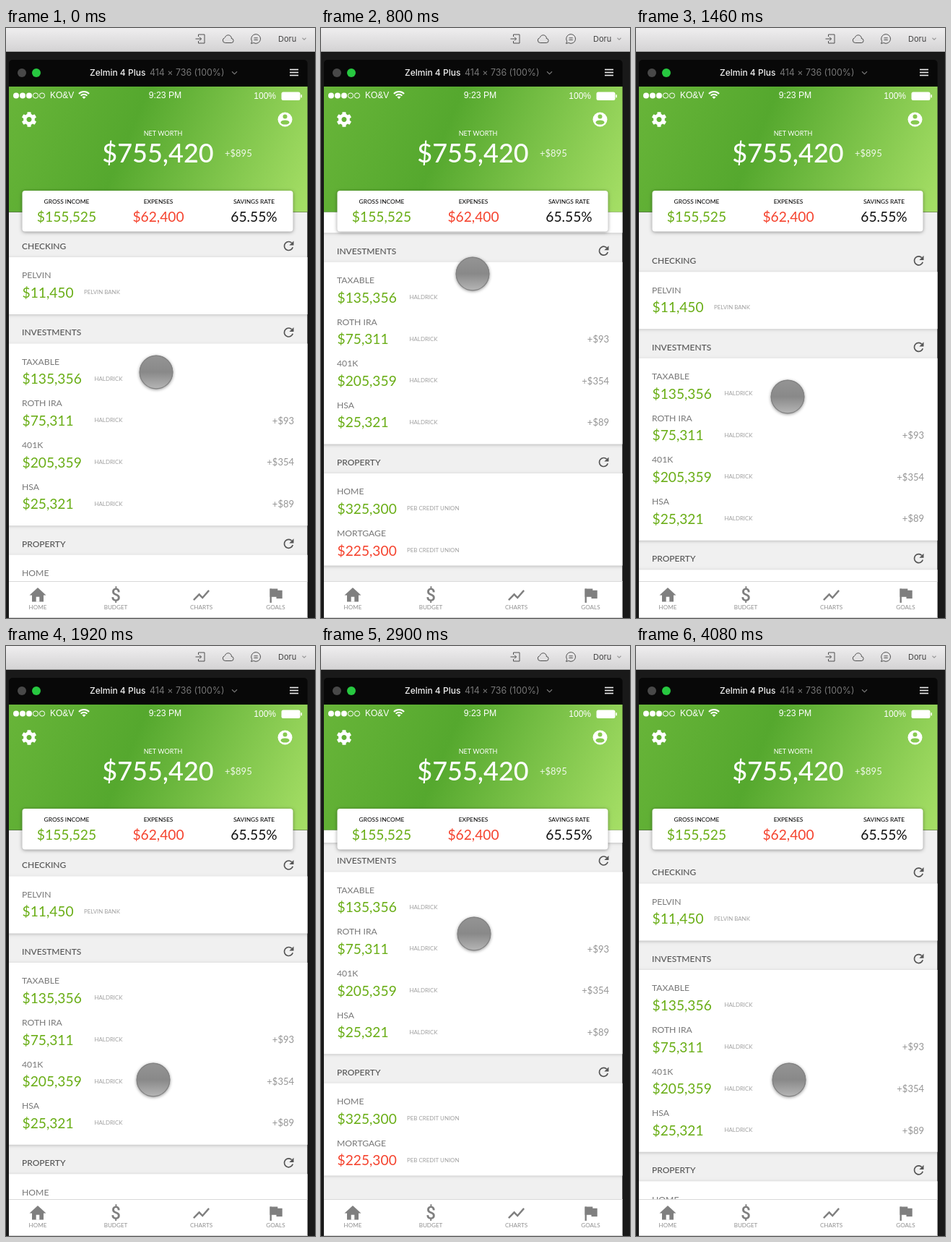
An HTML page with a canvas for the animation above (4.1 s loop, 428 by 816 pixels).

```html
<!DOCTYPE html>
<html lang="en">
<head>
<meta charset="utf-8">
<title>Net worth</title>
<style>
html, body { margin: 0; width: 100%; height: 100%; overflow: hidden; background: #161616; }
canvas { display: block; width: 428px; height: 816px; }
</style>
</head>
<body>
<canvas id="stage"></canvas>
<script>
const W = 428, H = 816, LOOP = 4100;
const LEFT = 4, RIGHT = 417.6, WIDE = RIGHT - LEFT;
const TOP = 81, HEAD = 254.5, NAV = 765, STEP = 57.6;
const GREEN = '#6aae17', RED = '#f5432e', GRAY = '#7f7f7f', WHITE = '#fff';
const UI = 'Inter, "Liberation Sans", sans-serif';
const APP = 'Lato, "Open Sans", sans-serif';
const STATUS = '"Liberation Sans", sans-serif';
const TAU = Math.PI * 2;

const canvas = document.getElementById('stage');
const c = canvas.getContext('2d');
const dpr = window.devicePixelRatio || 1;
canvas.width = W * dpr;
canvas.height = H * dpr;

// ---- motion ----
const drag = u => u * u * (3 - 2 * u);
const settle = u => 1 - (1 - u) ** 3;
const move = (start, end, to, ease = drag) => ({ start, end, to, ease });

// The finger drags the list, lets go, and the list settles
const scrollMoves = [
  move(120, 560, -100), move(560, 880, -113, settle),
  move(900, 1380, 32), move(1380, 1920, 1.5, settle),
  move(1980, 2480, -133), move(2480, 2900, -124, settle),
  move(3510, 3900, 38), move(3900, 4450, 0, settle)
];
const fingerMoves = [
  move(120, 600, 340), move(900, 1460, 510), move(1460, 1920, 600),
  move(1980, 2600, 398), move(2900, 3440, 392), move(3500, 4020, 600)
];

function follow(t, from, moves) {
  let v = from;
  for (const m of moves) {
    if (t <= m.start) break;
    v += (m.to - v) * m.ease(Math.min(1, (t - m.start) / (m.end - m.start)));
  }
  return v;
}

function pressed(t) {
  const depth = m => Math.min(t - m.start, m.end - t) / 60;
  const held = scrollMoves.filter(m => m.ease === drag).map(depth);
  return Math.max(0, Math.min(1, Math.max(...held)));
}

// ---- drawing helpers ----
// y is the middle of the capitals
function text(s, x, y, size, color, o = {}) {
  c.font = `${o.weight || 400} ${size}px ${o.font || APP}`;
  c.textAlign = o.align || 'left';
  c.fillStyle = color;
  c.fillText(s, x, y + size * .36);
}

function rect(x, y, w, h, color, r = 0) {
  c.fillStyle = color;
  c.beginPath();
  c.roundRect(x, y, w, h, r);
  c.fill();
}

function disc(x, y, r, color) {
  c.fillStyle = color;
  c.beginPath();
  c.arc(x, y, r, 0, TAU);
  c.fill();
}

function ring(x, y, r, width, color, from = 0, to = TAU) {
  c.strokeStyle = color;
  c.lineWidth = width;
  c.beginPath();
  c.arc(x, y, r, from, to);
  c.stroke();
}

function line(color, width, ...pts) {
  c.strokeStyle = color;
  c.lineWidth = width;
  c.beginPath();
  for (let i = 0; i < pts.length; i += 2) c.lineTo(pts[i], pts[i + 1]);
  c.stroke();
}

function triangle(color, ...pts) {
  c.fillStyle = color;
  c.beginPath();
  for (let i = 0; i < 6; i += 2) c.lineTo(pts[i], pts[i + 1]);
  c.fill();
}

function chevron(x, y, r, color) {
  line(color, 1.1, x - r, y - r / 2, x, y + r / 2, x + r, y - r / 2);
}

function shadowed(alpha, blur, dy, paint) {
  c.save();
  c.shadowColor = `rgba(0,0,0,${alpha})`;
  c.shadowBlur = blur * dpr;
  c.shadowOffsetY = dy * dpr;
  paint();
  c.restore();
}

function gradient(x0, y0, x1, y1, ...stops) {
  const g = c.createLinearGradient(x0, y0, x1, y1);
  for (const [p, color] of stops) g.addColorStop(p, color);
  return g;
}

// ---- icons, drawn around their own centre ----
const icons = {
  refresh(k) {
    ring(0, 0, 6, 1.7, k, .3, TAU - .8);
    triangle(k, .9, -.9, 7, -.9, 7, -7);
  },
  home(k) {
    triangle(k, 0, -10.5, 11.5, 0, -11.5, 0);
    rect(-8, -1, 16, 10, k);
    rect(-2.3, 2.2, 4.6, 7, WHITE);
  },
  dollar(k) {
    text('$', 0, 0, 24, k, { font: 'Roboto, sans-serif', weight: 500, align: 'center' });
  },
  chart(k) {
    line(k, 2.4, -10.6, 6.6, -2.9, -1.2, 1.7, 3.5, 10.6, -6.6);
  },
  flag(k) {
    rect(-8, -9, 2.4, 19.4, k);
    rect(-8, -9, 10.8, 11.3, k);
    rect(1, -6.8, 8.2, 11.4, k);
  },
  person() {
    disc(0, 0, 10, WHITE);
    disc(0, -4, 3, '#86c950');
    c.beginPath();
    c.ellipse(0, 4, 6, 3.1, 0, 0, TAU);
    c.fill();
  },
  gear() {
    ring(0, 0, 5.7, 4.4, WHITE);
    for (let i = 0; i < 6; i++) {
      rect(-2.6, -10.2, 5.2, 4, WHITE, .8);
      c.rotate(TAU / 6);
    }
  },
  door(k) {
    line(k, 1, -3, -3, -3, -6, 5.5, -6, 5.5, 6, -3, 6, -3, 3);
    line(k, 1, -7, 0, 1, 0);
    line(k, 1, -1.5, -2.5, 1, 0, -1.5, 2.5);
  },
  cloud(k) {
    c.strokeStyle = k;
    c.lineWidth = 1;
    c.beginPath();
    c.arc(-4, 2, 3.5, TAU / 4, TAU * .7);
    c.arc(0, -.5, 4.7, TAU * .55, TAU * .98);
    c.arc(4.3, 2.5, 3, -TAU / 4, TAU / 4);
    c.closePath();
    c.stroke();
  },
  bubble(k) {
    ring(0, 0, 6.4, 1, k, -3.7, 2.1);
    line(k, 1, -3.3, 5.5, -6.5, 6.5, -5.5, 3.4);
    for (const y of [-1.2, 1.4]) line(k, 1, -2.6, y, 2.6, y);
  }
};

function icon(name, x, y, color) {
  c.save();
  c.translate(x, y);
  icons[name](color);
  c.restore();
}

// ---- scene ----
function desktop() {
  rect(0, 0, W, H, '#191919');
  rect(0, 0, W, 33, gradient(0, 0, 0, 33, [0, '#efeeef'], [1, '#d3d2d3']));
  rect(0, 32, W, 1, '#a9a9a9');
  ['door', 'cloud', 'bubble'].forEach((name, i) => icon(name, 269.5 + i * 38.3, 15, '#505050'));
  text('Doru', 377, 15, 11, '#444', { font: UI });
  chevron(413, 15, 2.5, '#999');

  rect(LEFT, 44, WIDE, 60, '#080808', 5);
  disc(22, 62, 6, '#484848');
  disc(42, 62, 6, '#27c840');
  text('Zelmin 4 Plus', 116, 62, 12, '#f0f0f0', { font: UI, weight: 500 });
  text('414 × 736 (100%)', 199, 62, 12.4, '#777', { font: UI });
  chevron(316.5, 62, 3.5, '#777');
  for (let i = -1; i < 2; i++) line('#eee', 1.6, 393, 61.5 + i * 4, 405, 61.5 + i * 4);
}

const sections = [
  { title: 'CHECKING', bank: 'PELVIN BANK', bankX: 108, tail: 54,
    rows: [['PELVIN', '$11,450']] },
  { title: 'INVESTMENTS', bank: 'HALDRICK', bankX: 122.5, tail: 54,
    rows: [['TAXABLE', '$135,356'], ['ROTH IRA', '$75,311', '+$93'],
      ['401K', '$205,359', '+$354'], ['HSA', '$25,321', '+$89']] },
  { title: 'PROPERTY', bank: 'PEB CREDIT UNION', bankX: 119, tail: 45,
    rows: [['HOME', '$325,300'], ['MORTGAGE', '$225,300', '', RED]] }
];

function list(scroll) {
  c.save();
  c.beginPath();
  c.rect(LEFT, HEAD, WIDE, NAV - HEAD);
  c.clip();
  rect(LEFT, HEAD, WIDE, NAV - HEAD, '#f0f0f0');
  let top = 317 + scroll;
  for (const s of sections) {
    const height = 25 + STEP * (s.rows.length - 1) + s.tail;
    shadowed(.2, 4, 1, () => rect(LEFT - 6, top, WIDE + 12, height, WHITE));
    text(s.title, 22, top - 15.5, 12, '#555', { weight: 500 });
    icon('refresh', 391.5, top - 15.5, '#555');
    s.rows.forEach(([name, amount, gain = '', color = GREEN], i) => {
      const y = top + 25 + i * STEP;
      text(name, 22, y, 12.2, '#787878');
      text(amount, 22.5, y + 24, 19.2, color);
      text(s.bank, s.bankX, y + 23.5, 7.9, '#a0a0a0');
      text(gain, 399, y + 24, 13, '#959595', { align: 'right' });
    });
    top += height + 40.5;
  }
  c.restore();
}

function statusBar() {
  for (let i = 0; i < 5; i++) {
    const x = 14 + i * 9;
    if (i < 3) disc(x, 93.5, 4, WHITE);
    else ring(x, 93.5, 3.6, 1, WHITE);
  }
  text('KO&V', 61, 93, 12, WHITE, { font: STATUS });
  for (const r of [1.8, 6.2, 10]) ring(108, 98, r, r < 2 ? 3.6 : 2, WHITE, -TAU * 3 / 8, -TAU / 8);
  text('9:23 PM', 220.5, 92.5, 12.2, WHITE, { font: STATUS, align: 'center' });
  text('100%', 374, 93.5, 12, WHITE, { font: STATUS, align: 'right' });
  rect(381.5, 88.5, 26, 11.5, WHITE, 2.5);
  rect(408.3, 92, 1.6, 4.5, WHITE, .8);
}

const stats = [
  ['GROSS INCOME', '$155,525', 84, GREEN],
  ['EXPENSES', '$62,400', 211, RED],
  ['SAVINGS RATE', '65.55%', 343.5, '#111']
];

function header() {
  rect(LEFT, TOP, WIDE, HEAD - TOP,
    gradient(LEFT, TOP, RIGHT, HEAD, [0, '#68b539'], [.4, '#55a82e'], [1, '#a6df66']));
  statusBar();
  icon('gear', 32, 126.5);
  icon('person', 386.5, 126.5);
  text('NET WORTH', 217.5, 146, 9, WHITE, { align: 'center' });
  text('$755,420', 210.5, 173, 36, WHITE, { align: 'center', weight: 500 });
  text('+$895', 303, 173, 13, 'rgba(255,255,255,.88)');

  shadowed(.4, 5, 1, () => rect(22.5, 225, 375, 56.5, WHITE, 4));
  for (const [label, value, x, color] of stats) {
    text(label, x, 239.5, 8.4, '#111', { align: 'center', weight: 500 });
    text(value, x, 261, 19.2, color, { align: 'center' });
  }
}

const tabs = [['home', 44], ['dollar', 152, 'budget'], ['chart', 270.5, 'charts'], ['flag', 373.5, 'goals']];

function nav() {
  rect(LEFT, NAV, WIDE, H - NAV, WHITE);
  rect(LEFT, NAV, WIDE, 1, '#d9d9d9');
  rect(LEFT, H - 1, WIDE, 1, '#d0d0d0');
  for (const [name, x, label = name] of tabs) {
    icon(name, x, 784.5, GRAY);
    text(label.toUpperCase(), x, 801.5, 8.1, '#909090', { align: 'center' });
  }
}

function pointer(x, y, press) {
  const r = 23.3 - 1.3 * press;
  shadowed(.45, 4, 1, () => disc(x, y, r,
    gradient(0, y - r, 0, y + r, [0, '#949494'], [.5, '#898989'], [1, '#b6b6b6'])));
  ring(x, y, r - .5, 1.2, '#828282');
}

function draw(t) {
  c.setTransform(dpr, 0, 0, dpr, 0, 0);
  desktop();
  list(follow(t, 0, scrollMoves));
  header();
  nav();
  const y = follow(t, 476, fingerMoves);
  const sway = follow(t, 208, [move(120, 600, 210), move(1460, 1920, 204), move(1980, 2600, 212)]);
  pointer(sway, y, pressed(t));
}

const start = performance.now();
function tick() {
  const t = (performance.now() - start) % LOOP;
  draw(Math.floor(t / 20) * 20);
  requestAnimationFrame(tick);
}
tick();
</script>
</body>
</html>
```
